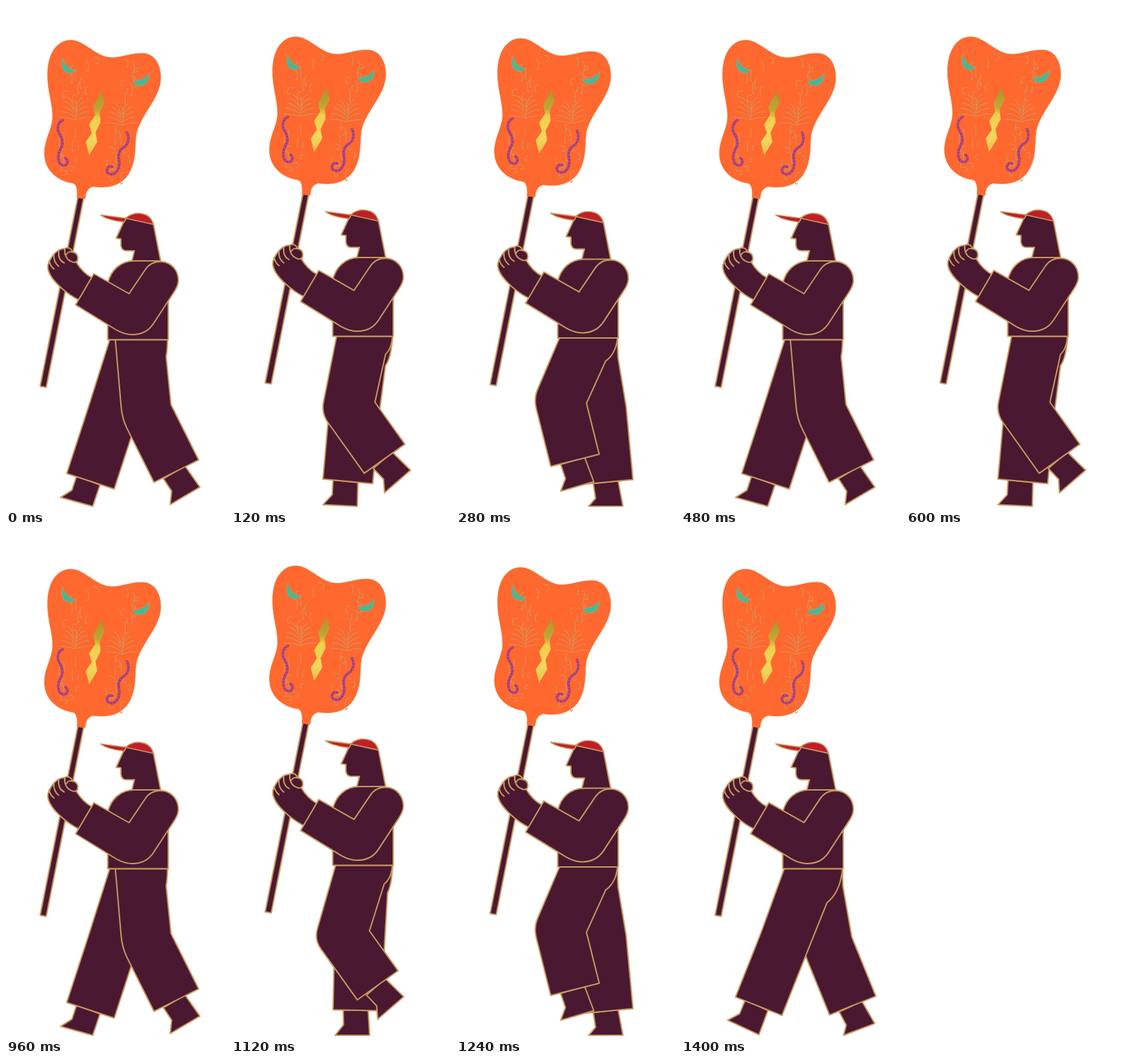
An HTML page for the animation above (1.44 s loop, 324x741 px).

```html
<!DOCTYPE html>
<html lang="en">
<head>
<meta charset="utf-8">
<title>Walking lantern bearer</title>
<style>
  html, body { margin: 0; width: 100%; height: 100%; overflow: hidden; background: #fff; }
  svg { display: block; width: 100%; height: 100%; }
  .skin { fill: #4a1931; stroke: #c99860; stroke-width: 2; stroke-linejoin: round; }
  .thin { fill: none; stroke: #c99860; stroke-width: 2; stroke-linecap: round; }
  .cap { fill: #c01f27; stroke: #c99860; stroke-width: 1.6; stroke-linejoin: round; }
  .deco { fill: none; stroke: #d3935a; stroke-width: 1.1; stroke-linecap: round; }
  .eye { fill: #48b894; stroke: #c99860; stroke-width: .8; }
  .curl { fill: none; stroke: #a33a8a; stroke-width: 3.6; stroke-linecap: round; }
  .fleck { fill: none; stroke: #c98a78; stroke-width: .9; stroke-dasharray: 2 3; }
</style>
</head>
<body>
<svg viewBox="0 0 324 741">
  <defs>
    <linearGradient id="gold" x1="0" y1="0" x2="0" y2="1">
      <stop offset="0" stop-color="#a8962a"/>
      <stop offset=".3" stop-color="#c4a634"/>
      <stop offset=".42" stop-color="#efcf4c"/>
      <stop offset=".75" stop-color="#f3d75c"/>
      <stop offset="1" stop-color="#e6be45"/>
    </linearGradient>
  </defs>

  <path class="skin" id="farFoot"/>
  <path class="skin" id="farLeg"/>
  <path class="skin" id="nearFoot"/>
  <path class="skin" id="nearLeg"/>

  <g id="body">
    <path class="skin" d="M106.500 282L115 283.500L59.500 564L50.500 562.500Z"/>

    <path fill="#ff682e" stroke="#e8854a" stroke-width=".7" d="M95 50.500C114 50 128 70 149 75.500C168 79 182 69 203 70C221 71 229 88 229 106C229 135 201 158 193 188C190 205 194 228 181 249C167 270 143 269 129 267C119 270 118 277 117 285L105 283.500C106 273 105 263 98 262C78 259 59 245 57 222C55 200 68 184 69 165C69 142 61 126 61.500 100C62 69 76 51 95 50.500Z"/>
    <path class="deco" id="doodles"/>

    <path class="eye" d="M84 76.500C87 87 93 93 103 95C101 100 91 101 86 96C81 91 82 82 84 76.500Z"/>
    <path class="eye" d="M187 111C197 111 206 107 212 99.500C213 110 207 118 198 118C192 118 189 115 187 111Z"/>
    <path fill="url(#gold)" d="M141 126L146 143L138.500 158L140 172L132.500 187L135 201L123 221L118 201L127 188L123 175L132 161L129 149Z"/>
    <g id="curls"></g>

    <path class="skin" d="M177 313L163 343.500L170 344.500V354Q171 362 178 362H190L186 378H229L218 322Z"/>
    <path class="cap" d="M140 309L178 314L175 319.500C161 318 147 315 140 309Z"/>
    <path class="cap" d="M177 314C187 303 213 303 218 323Z"/>

    <path class="skin" d="M150.500 493.500V410C155 391 169 377 190 377H228L240 400V493.500Z"/>
    <path class="skin" d="M127 402C118 397 110 389 104 379C108 374 107 365 98 364C97 358 91 356 86 359C75 359 66 371 62 383C60 396 73 409 83 418C91 425 98 430 108 435Z"/>
    <path class="thin" d="M64 377C65 383 67 386 71 389M71 368C70 376 73 381 78 385M78 362C77 371 80 377 86 380M87 359C86 368 90 375 95 377C100 380 104 380 106 376M89 368C91 364 95 363 98 364"/>
    <path class="skin" d="M182 425.500L206 390C212 381 221 378 229 378C246 379 255 392 255 406C255 413 252 418 248 424L218 470C210 482 198 486 187 486C177 486 170 483 163 479L103 442L130 396Z"/>
  </g>
</svg>

<script>
const STEP = 480, TICK = 40, GROUND = 740;
const HIP = [197, 492], WAIST = 493.5, HALF = 37;

// Knee and hem centres: four poses swinging forward, four carrying the weight back.
const beats = [0, 160, 280, 440];
const poses = [
  [208,600, 252,688], [164,592, 217,666], [154,584, 176,672], [152,604, 115,697],
  [156,608, 125,703], [190,607, 188,703], [215,597, 225,704], [217,605, 254,696]
];
const shoe = [[-22, 0], [-21, 22], [-33, 38], [18, 38], [15, 0]];

const $ = id => document.getElementById(id);
const add = (p, q, k = 1) => [p[0] + q[0] * k, p[1] + q[1] * k];
const sub = (p, q) => add(p, q, -1);
const mix = (p, q, k) => add(p, sub(q, p), k);
const unit = p => add([0, 0], p, 1 / Math.hypot(...p));
const across = p => [p[1], -p[0]];

// Smooth cyclic curve through the poses.
function poseAt(t) {
  const time = i => beats[(i + 8) % 4] + Math.floor(i / 4) * STEP;
  const pose = i => poses[(i + 8) % 8];
  let i = 7;
  while (time(i) > t) i--;
  const h = time(i + 1) - time(i), u = (t - time(i)) / h;
  const slope = (j, k) => (pose(j + 1)[k] - pose(j - 1)[k]) / (time(j + 1) - time(j - 1)) * h;
  return pose(i).map((a, k) => {
    const b = pose(i + 1)[k], m = slope(i, k), q = slope(i + 1, k);
    return a + u * (m + u * (3 * (b - a) - 2 * m - q + u * (2 * (a - b) + m + q)));
  });
}

// Trouser leg: two tubes of equal width, mitred at the knee and cut square at the hem.
function drawLeg(name, t, lift) {
  const [kx, ky, hx, hy] = poseAt(t);
  const knee = [kx, ky], hem = [hx, hy], hip = [HIP[0], HIP[1] + lift];
  const thigh = unit(sub(knee, hip)), shin = unit(sub(hem, knee));
  const hemDir = across(shin), kneeDir = across(unit(add(thigh, shin)));
  const mitre = HALF / (kneeDir[0] * hemDir[0] + kneeDir[1] * hemDir[1]);

  const front = [160 + (kx - HIP[0]) * .16, WAIST + lift], back = [239, WAIST + lift];
  const kneeFront = add(knee, kneeDir, -mitre), kneeBack = add(knee, kneeDir, mitre);
  const hemFront = add(hem, hemDir, -HALF), hemBack = add(hem, hemDir, HALF);
  const seat = add(kneeBack, sub(hip, knee), .66);
  const bend = [mix(back, seat, .15)[0], mix(back, seat, .7)[1]];
  $(name + "Leg").setAttribute("d",
    `M${front}L${mix(kneeFront, front, .15)}Q${kneeFront} ${mix(kneeFront, hemFront, .15)}` +
    `L${hemFront}L${hemBack}L${kneeBack}L${seat}Q${bend} ${back}Z`);

  const tilt = 1.15 * Math.atan2(hemDir[1], hemDir[0]), c = Math.cos(tilt), s = Math.sin(tilt);
  const sole = shoe.map(([x, y]) => [hx + x * c - y * s, Math.min(GROUND, hy + x * s + y * c)]);
  $(name + "Foot").setAttribute("d", `M${sole.join("L")}Z`);
}

// Fine line work on the lantern: leafy fans and scattered curls on both sides of its axis.
function doodles() {
  let seed = 7, d = "";
  const rnd = (a, b) => a + (b - a) * ((seed = seed * 16807 % 2147483647) / 2147483647);
  for (const [x, y] of [[102, 168], [171, 176]]) {
    d += `M${x} ${y}q4 -14 1 -28`;
    for (let i = 0; i < 10; i++) {
      const side = i % 2 ? 1 : -1, a = .15 + (i >> 1) * .22, r = 23 - (i >> 1);
      const dx = side * r * Math.cos(a), dy = -r * Math.sin(a);
      d += `M${x + side} ${y - (i >> 1) * 4}q${dx * .4} ${dy * .9} ${dx} ${dy}`;
    }
  }
  for (let i = 0; i < 56; i++) {
    const side = i % 2 ? 1 : -1, y = 76 + i * 3.1;
    if (y > 134 && y < 178) continue;
    const x = 150 - (y - 75) * .15 + side * rnd(20, 54);
    const w = rnd(-9, 9), h = rnd(3, 10);
    d += `M${x} ${y}q${w} ${-h * .2} ${w} ${h}t${-w * .6} ${h * .5}`;
  }
  return d;
}
$("doodles").setAttribute("d", doodles());

const curls = [
  "M84 169C77 172 75 181 78 187C81 193 85 198 83 206C81 213 75 219 78 229C80 237 90 238 91 231Q91 227 88 225",
  "M179 187C183 196 181 204 174 209C167 214 165 219 167 226C169 234 167 244 160 248C152 251 146 244 151 239Q154 236 157 238"
];
$("curls").innerHTML = curls.map(d => `<path class="curl" d="${d}"/><path class="fleck" d="${d}"/>`).join("");

function draw(now) {
  const t = Math.floor(now / TICK) * TICK % STEP;
  const lift = -5 * Math.sin(Math.PI * (t / STEP) ** .55) ** 2;
  drawLeg("near", t, lift);
  drawLeg("far", t + STEP, lift);
  $("body").setAttribute("transform", `translate(0 ${lift})`);
}

let start;
function loop(now) {
  start ??= now;
  draw(Math.max(0, now - start));
  requestAnimationFrame(loop);
}
draw(0);
requestAnimationFrame(loop);
</script>
</body>
</html>
```
